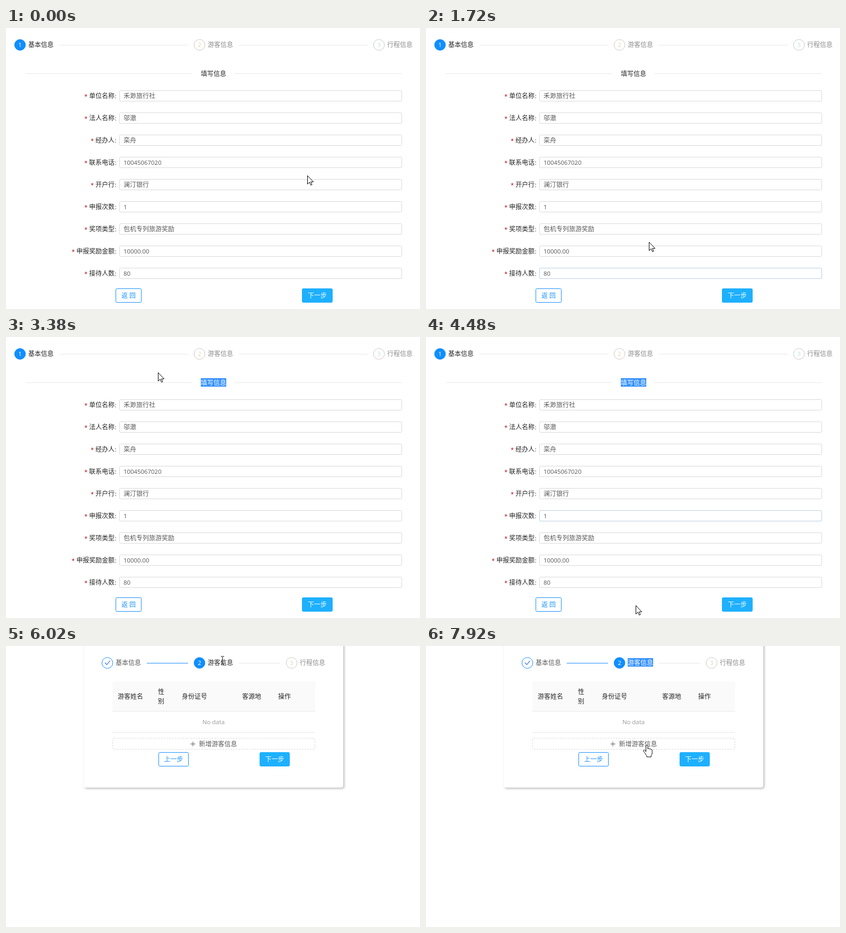
Recreate the animation shown at these times as an HTML page. Size 782 by 532 pixels, loop 7.99 s.

```html
<!DOCTYPE html>
<html lang="zh-CN">
<head>
<meta charset="utf-8">
<title>分步表单</title>
<style>
html, body { margin: 0; width: 100%; height: 100%; overflow: hidden; background: #fff; }
svg { display: block; width: 100vw; height: 100vh; }
text { font-family: "Open Sans", "Noto Sans CJK SC", sans-serif; white-space: pre; }
.card { filter: drop-shadow(2px 2px 2px #0004); }
</style>
</head>
<body>
<svg id="stage" viewBox="0 0 782 532">
  <g id="form"></g>
  <g id="list"></g>
  <g id="cursor" stroke="#000" fill="#fff"></g>
</svg>
<script>
const LOOP = 7990;
const BLUE = '#108eff', SKY = '#1eb0ff', INK = '#262626', BODY = '#595959', GRAY = '#8c8c8c', LINE = '#e8e8e8';
const byId = id => document.getElementById(id);
const form = byId('form'), list = byId('list'), cursor = byId('cursor');

function add(parent, tag, attrs) {
  const el = document.createElementNS('http://www.w3.org/2000/svg', tag);
  for (const key in attrs) el.setAttribute(key, attrs[key]);
  return parent.appendChild(el);
}
function text(parent, str, x, y, fill = INK, more = {}) {
  const size = /[\u4e00-\u9fff]/.test(str) ? 12 : 11.4;
  const el = add(parent, 'text', { x, y, fill, 'font-size': size, ...more });
  el.textContent = str;
  return el;
}
const box = (parent, x, y, width, height, more) =>
  add(parent, 'rect', { x, y, width, height, ...more });
const rule = (parent, x1, x2, y, color = LINE) =>
  box(parent, x1, y, x2 - x1, 1, { fill: color });

function button(parent, str, x, y, width, textX, primary) {
  const face = box(parent, x + .5, y + .5, width - 1, 26, {
    rx: 2, fill: primary ? SKY : '#fff', stroke: primary ? SKY : '#1890ff' });
  text(parent, str, textX, y + 18, primary ? '#fff' : '#1890ff');
  return face;
}
function step(parent, x, num, title, ring, fill, numColor, titleColor) {
  const dot = add(parent, 'circle', { cx: x, cy: 32, r: 10.3, fill, stroke: ring });
  if (num) text(parent, num, x, 36, numColor, { 'text-anchor': 'middle' });
  text(parent, title, x + 15.5, 36, titleColor);
  return dot;
}
// Text whose characters can be selected from the left or the right end.
function selectable(parent, str, x, y, fromRight) {
  text(parent, str, x, y);
  const mark = box(parent, x, y - 13, 0, 16, { fill: '#3390ff' });
  const chars = [...str].map((ch, i) => text(parent, ch, x + 12 * i, y, '#fff'));
  return n => {
    const first = fromRight ? str.length - n : 0;
    mark.setAttribute('x', x + 12 * first);
    mark.setAttribute('width', 12 * n);
    chars.forEach((c, i) => c.setAttribute('opacity', +(i >= first && i < first + n)));
  };
}

// First page
step(form, 26.5, '1', '基本信息', BLUE, BLUE, '#fff', INK);
rule(form, 101, 344, 32);
step(form, 365.5, '2', '游客信息', '#cfc8c4', '#fff', '#e6d3a8', GRAY);
rule(form, 440, 683, 32);
step(form, 704.5, '3', '行程信息', '#cfc8c4', '#fff', '#c0e0e8', GRAY);
rule(form, 37, 352, 86);
rule(form, 432, 748, 86);
const selectTitle = selectable(form, '填写信息', 368, 91, true);
const fields = [
  ['单位名称', '禾渺旅行社'], ['法人名称', '邬澈'], ['经办人', '栾舟'],
  ['联系电话', '10045067020'], ['开户行', '澜汀银行'], ['申报次数', '1'],
  ['奖项类型', '包机专列旅游奖励'], ['申报奖励金额', '10000.00'], ['接待人数', '80']
];
const glows = fields.map(([label, value], i) => {
  const y = 118 + 42 * i, x = 205 - 12 * label.length;
  const frame = { rx: 2, fill: 'none' };
  text(form, '*', x - 6, y + 18, '#b81c22',
    { 'text-anchor': 'middle', style: 'font:14px "Liberation Mono",monospace' });
  text(form, label, x, y + 15);
  text(form, ':', 205.5, y + 15);
  text(form, value, 222, y + 15, BODY);
  box(form, 214.5, y + .5, 533, 20, { ...frame, stroke: '#d9d9d9' });
  return box(form, 214.5, y + .5, 533, 20, { ...frame, stroke: '#40a9ff' });
});
button(form, '返 回', 207, 493, 49, 218);
const next = button(form, '下一步', 559, 493, 58, 570, true);

// Second page
box(list, 147, -10, 490, 278, { rx: 4, fill: '#fff', class: 'card' });
const doneDot = step(list, 191.5, '', '基本信息', '#1890ff', BLUE, '', BODY);
add(list, 'path', { d: 'M187 31.5l3.4 3.8 6-7.3', fill: 'none', stroke: '#4a7fd8', 'stroke-width': 1.3 });
rule(list, 266, 344, 32, '#1890ff');
const nowDot = step(list, 365.5, '2', '', BLUE, BLUE, '#fff', INK);
const selectStep = selectable(list, '游客信息', 381, 36, false);
rule(list, 440, 518, 32);
step(list, 539.5, '3', '行程信息', '#cccac6', '#fff', '#ddd2b4', GRAY);
box(list, 201, 67, 383, 57, { fill: '#fafafa' });
rule(list, 201, 584, 123);
[['游客姓名', 211, 100], ['性', 287, 91], ['别', 287, 109], ['身份证号', 332, 100],
 ['客源地', 446, 100], ['操作', 514, 100]].forEach(cell => text(list, ...cell));
text(list, 'No data', 392, 148, '#999', { 'text-anchor': 'middle' });
rule(list, 201, 584, 163);
box(list, 201.5, 174.5, 382, 21, { rx: 2, fill: 'none', stroke: '#d9d9d9', 'stroke-dasharray': '3 2' });
add(list, 'path', { d: 'M348.5 185.5h9M353 181v9', stroke: BODY });
text(list, '新增游客信息', 364.5, 190, BODY);
button(list, '上一步', 288, 201, 57, 298.5);
button(list, '下一步', 479, 201, 57, 489.5, true);

// Pointer shapes, drawn around their hot spot
const shapes = {
  arrow: ['M.5.5V16.5L4.2 13 6.7 18.5 9 17.5 6.6 12.3H11.6Z'],
  beam: ['M-3-7.5H-1L0-6.5 1-7.5H3M-3 7.5H-1L0 6.5 1 7.5H3M0-6.5V6.5', 'none'],
  hand: ['M-.5 13V2.5q0-2 1.7-2t1.8 2V8q0-1 1.6-1t1.7 1.4q.2-.7 1.5-.6t1.5 1.4q1.8-.6 1.9 1.4V15q0 4-2 5.5v2.5H1V21Q-1 18.5-2.5 15.5L-5.2 12q-.6-1.6.7-2t2.2.8Z']
};
for (const name in shapes) {
  const [d, fill = '#fff'] = shapes[name];
  shapes[name] = add(cursor, 'path', { d, fill });
}

// Bursts of pointer moves: start, end, then the stops "x,y" spread evenly; "-" hides it
const moves = [
  [0, 0, '569,279'],
  [350, 1090, '560,262 515,228 440,180 340,140 240,107 160,100 118,104 112,118'],
  [1200, 1720, '90,150 80,215 100,310 190,405 320,460 421,405'],
  [1880, 2610, '424,385 428,340 432,270 434,190 430,125 416,92 408,87 395,86'],
  [2730, 3170, '391,86 386,86 381,85 376,84 371,84'],
  [3380, 4050, '287,67 250,60 205,50 160,42 125,36 105,33 98,33'],
  [4270, 4585, '125,110 270,340 396,508 -'],
  [4820, 5030, '600,519 598,513 597,509'],
  [5250, 5580, '597,508 597,508 597,508 597,508'],
  [5810, 6120, '540,300 440,90 409,27 404,27'],
  [6350, 6570, '402,25 390,30 384,38'],
  [6790, 7130, '393,28 410,29 424,31 432,31'],
  [7450, 7780, '375,90 353,150 380,198 412,194'],
  [7920, 7920, '416,187']
];
const stops = moves.flatMap(([start, end, path]) => {
  const points = path.split(' ');
  return points.map((p, i) => {
    const [x, y] = p.split(',').map(Number);
    return { t: start + (end - start) * i / Math.max(1, points.length - 1), x, y, gone: p === '-' };
  });
});

const SWITCH = 5250;
const within = (p, x1, y1, x2, y2) => p.x >= x1 && p.x <= x2 && p.y >= y1 && p.y <= y2;
const overField = (p, i) => p.t < SWITCH && within(p, 214, 118 + 42 * i, 748, 139 + 42 * i);
const overNext = p => p.t < SWITCH && within(p, 559, 493, 617, 520);
function shapeFor(p) {
  if (p.t < SWITCH) {
    if (overNext(p)) return 'hand';
    const title = within(p, 367, 78, 417, 95);
    return title || fields.some((_, i) => overField(p, i)) ? 'beam' : 'arrow';
  }
  if (p.t < SWITCH + 220 || within(p, 201, 174, 584, 198)) return 'hand';
  return within(p, 378, 22, 436, 40) ? 'beam' : 'arrow';
}
const count = (t, times) => times.filter(s => t >= s).length;

function draw(t) {
  let n = stops.length - 1;
  while (stops[n].t > t) n--;
  const at = stops[n], before = stops[Math.max(0, n - 1)];
  const second = t >= SWITCH;
  form.style.display = second ? 'none' : '';
  list.style.display = second ? '' : 'none';

  const kind = at.gone ? '' : shapeFor(at);
  for (const name in shapes) shapes[name].style.display = name === kind ? '' : 'none';
  if (!at.gone) cursor.setAttribute('transform', `translate(${at.x} ${at.y})`);

  glows.forEach((g, i) => g.setAttribute('opacity',
    overField(at, i) ? .7 : overField(before, i) ? .2 : 0));
  next.setAttribute('fill', overNext(at) ? '#4bbcff' : SKY);
  selectTitle(count(t, [2505, 2610, 2840, 3060]));
  selectStep(count(t, [6790, 6903, 7016, 7016]));

  const k = [0, .5, .85, 1][count(t, [5360, 5470, 5580])];
  doneDot.setAttribute('fill-opacity', 1 - k);
  nowDot.setAttribute('fill-opacity', .28 + .72 * k);
  nowDot.setAttribute('stroke', k ? BLUE : '#70aad6');
}

const begin = performance.now();
function tick() {
  draw((performance.now() - begin) % LOOP);
  requestAnimationFrame(tick);
}
tick();
</script>
</body>
</html>
```
